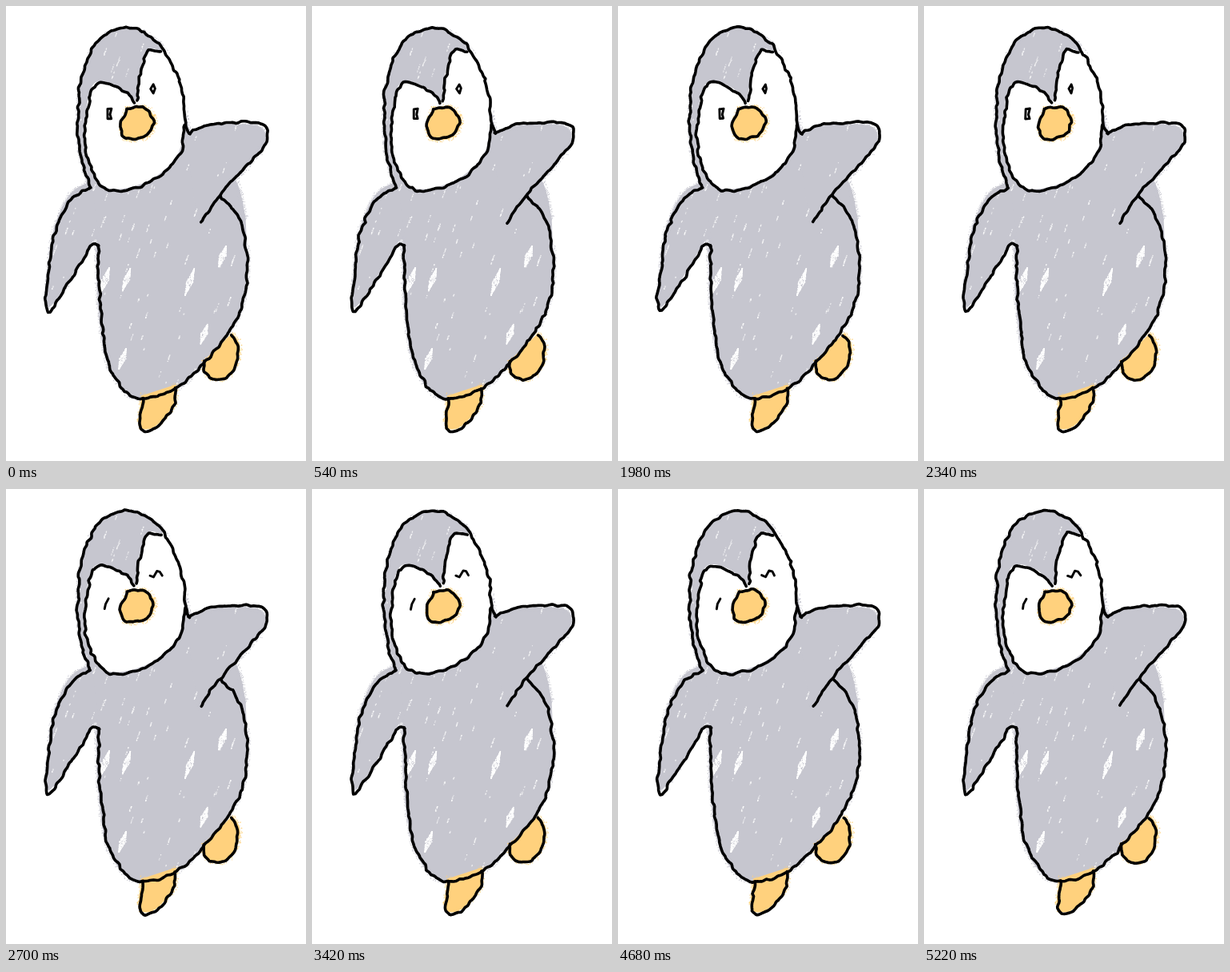
An HTML page with a canvas that plays this animation: 375 by 568 pixels, repeating every 5400 ms.

```html
<!DOCTYPE html>
<html lang="en">
<head>
<meta charset="utf-8">
<title>Penguin</title>
<style>
html, body { margin: 0; width: 100%; height: 100%; overflow: hidden; background: #fff; }
canvas { display: block; }
</style>
</head>
<body>
<canvas id="stage" width="375" height="568"></canvas>
<script>
const W = 375, H = 568, STEP = 180, LOOP = 5400, BLINK = 2700;
const GREY = '#c6c6cf', YELLOW = '#ffd17d';
const ctx = document.getElementById('stage').getContext('2d');

const pairs = (...v) => v.flatMap((x, i) => i % 2 ? [] : [[x, v[i + 1]]]);

// Smooth curve through a few key points
function curve(keys) {
  const out = [], at = i => keys[Math.max(0, Math.min(keys.length - 1, i))];
  for (let i = 0; i < keys.length - 1; i++) {
    const [a, b, c, d] = [at(i - 1), at(i), at(i + 1), at(i + 2)];
    const parts = Math.ceil(Math.hypot(c[0] - b[0], c[1] - b[1]) / 2);
    for (let k = 0; k < parts; k++) {
      const t = k / parts;
      out.push([0, 1].map(j => b[j] + t / 2 * (c[j] - a[j] +
        t * (2 * a[j] - 5 * b[j] + 4 * c[j] - d[j] + t * (3 * (b[j] - c[j]) + d[j] - a[j])))));
    }
  }
  out.push(at(keys.length));
  return out;
}
const shape = (...v) => curve(pairs(...v));

const head = shape(105,227, 92,180, 91,110, 111,48, 150,27, 189,45, 217,95, 224,142, 229,160);
const face = shape(160,122, 142,103, 112,98, 101,135, 101,185, 125,228, 175,222, 214,190, 224,148);
const brow = shape(194,58, 178,57, 167,88, 164,118);
const wing = shape(228,159, 255,148, 290,145, 322,149, 324,171, 294,207, 268,236, 244,270);
const arm = shape(106,227, 80,243, 60,286, 53,335, 50,376, 58,376, 88,330, 107,299, 116,300);
const side = shape(268,237, 291,265, 302,320, 291,385, 250,443, 211,478, 163,489, 130,450, 118,380, 115,299);
const rightFoot = shape(282,411, 291,428, 283,456, 264,467, 248,457, 248,444);
const leftFoot = shape(211,477, 209,500, 186,527, 168,527, 171,490);
const beak = shape(151,129, 172,127, 184,143, 173,163, 148,164, 144,148, 151,129);
const outlines = [head, face, brow, wing, arm, side, rightFoot, leftFoot, beak];

const openEyes = [pairs(127,129, 132,128, 130,135, 132,141, 127,141, 127,129), pairs(181,103, 184,98, 186,103, 184,109, 181,103)];
const closedEyes = [pairs(123,150, 125,144, 128,137), pairs(180,108, 184,110, 189,102, 193,103, 196,108)];

function hash(x, y, seed) {
  let h = Math.imul(x, 374761393) ^ Math.imul(y, 668265263) ^ Math.imul(seed + 1, 1274126177);
  h = Math.imul(h ^ h >>> 13, 1103515245);
  h = Math.imul(h ^ h >>> 15, 2246822519);
  return ((h ^ h >>> 16) >>> 0) / 2 ** 32;
}

// Smooth noise from -1 to 1
function noise(x, y, seed, cell) {
  x /= cell; y /= cell;
  const i = Math.floor(x), j = Math.floor(y), u = x - i, v = y - j;
  const row = k => hash(i, k, seed) * (1 - u) + hash(i + 1, k, seed) * u;
  return 2 * (row(j) * (1 - v) + row(j + 1) * v) - 1;
}

function path(c, points) {
  c.beginPath();
  points.forEach(([x, y]) => c.lineTo(x, y));
}

function makeCrayon() {
  const layer = document.createElement('canvas');
  layer.width = W; layer.height = H;
  const c = layer.getContext('2d');
  let count = 0;
  const rnd = (low, high) => low + (high - low) * hash(++count, 7, 3);
  const dot = (x, y, color, size) => {
    c.fillStyle = color;
    c.fillRect(x, y, size, size);
  };

  // Fill slightly off the outline, with a grainy edge
  const area = (points, color, dx, dy) => {
    const edge = points.map(([x, y]) => [x + dx, y + dy]);
    c.fillStyle = c.strokeStyle = color;
    c.lineWidth = 3;
    path(c, edge);
    c.fill();
    c.stroke();
    for (const [x, y] of edge)
      for (let k = 0; k < 6; k++)
        dot(x + rnd(-4, 4), y + rnd(-4, 4), color, 1);
  };
  // Slanted stroke of bare paper
  const streak = (x, y, length, width) => {
    for (let k = 0; k < length * width; k++) {
      const s = rnd(-.5, .5), w = width * (1 - 2 * Math.abs(s));
      dot(x - s * length * .35 + rnd(-w, w) / 2, y + s * length, '#fff', 1.2);
    }
  };

  const shoulders = pairs(107,226, 165,212, 232,162, 284,214, 299,265);
  const belly = side.filter(([x, y]) => y > 300);
  area([...curve(shoulders), ...belly], GREY, -1, -1);
  area(wing, GREY, -4, 4);
  area(arm, GREY, 1, -7);
  area(head, GREY, 1, 2);
  c.fillStyle = '#fff';
  path(c, [...face, [235, 100], [200, 55], ...brow].map(([x, y]) => [x - 1, y - 2]));
  c.fill();

  c.globalAlpha = .6;
  for (let k = 0; k < 130; k++) streak(rnd(55, 295), rnd(35, 480), rnd(2, 14), rnd(.4, 2));
  c.globalAlpha = 1;
  for (const [x, y] of pairs(150,341, 229,344, 270,312, 123,342, 145,440, 247,409))
    streak(x, y, rnd(24, 34), rnd(8, 11));

  area(rightFoot, YELLOW, 0, -2);
  area(leftFoot, YELLOW, 0, -4);
  area(beak, YELLOW, 1, 0);
  return layer;
}

// A lasting roughness plus a wobble that changes with each step
function ink(points, step, width, size) {
  const shift = (x, y, axis) => size * (1.3 * noise(x, y, axis, 5) +
    1.3 * noise(x, y, axis + 2 * step + 2, 6) + .5 * noise(x, y, axis + 2 * step + 90, 30));
  path(ctx, points.map(([x, y]) => [x + shift(x, y, 0), y + shift(x, y, 1)]));
  ctx.lineWidth = width;
  ctx.stroke();
}

const crayon = makeCrayon();

function draw(step) {
  ctx.fillStyle = '#fff';
  ctx.fillRect(0, 0, W, H);
  ctx.drawImage(crayon, 0, 0);
  ctx.strokeStyle = '#000';
  ctx.lineCap = ctx.lineJoin = 'round';
  outlines.forEach(points => ink(points, step, 3.6, 1));
  const eyes = step * STEP < BLINK ? openEyes : closedEyes;
  eyes.forEach(points => ink(points, step, 2.9, .4));
}

const start = performance.now();
let shown = -1;
function tick() {
  const step = Math.floor((performance.now() - start) % LOOP / STEP);
  if (step !== shown) draw(shown = step);
  requestAnimationFrame(tick);
}
tick();
</script>
</body>
</html>
```
